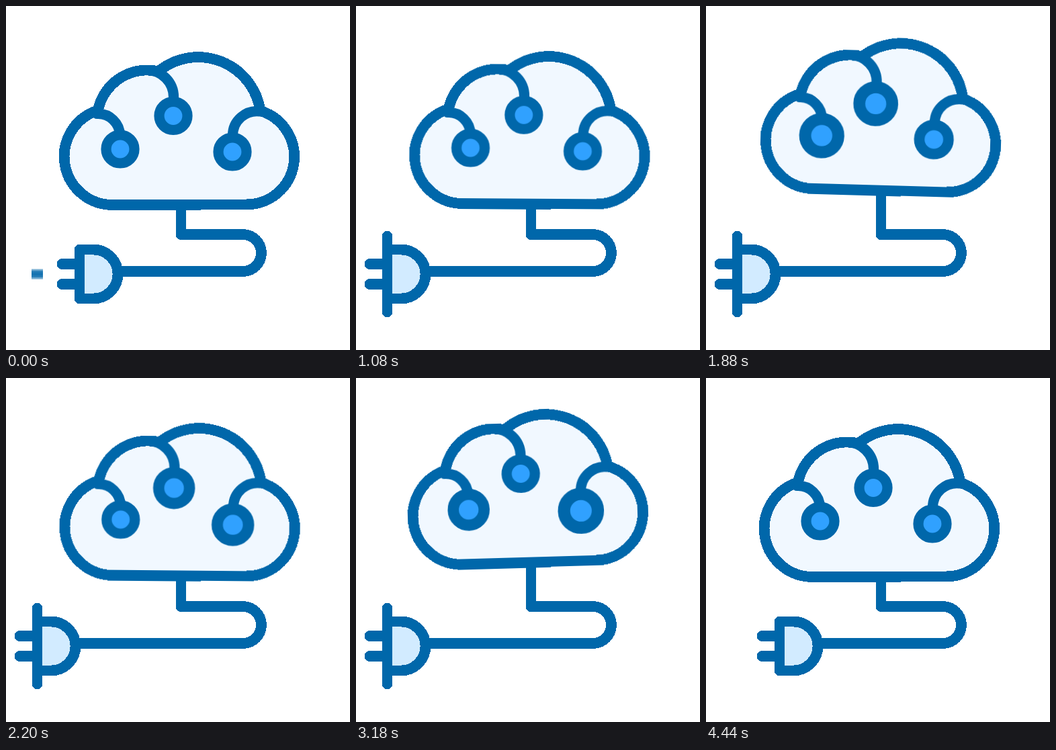
Animation, 512 px wide and 512 px high, one loop 4820 ms. Source, as an HTML page:

```html
<!DOCTYPE html>
<html lang="en">
<head>
<meta charset="utf-8">
<title>Cloud power</title>
<style>
  :root {
    --line: #0067aa;
    --sine: cubic-bezier(.37, 0, .63, 1);
    --cubic-in: cubic-bezier(.333, 0, .667, 0);
    --cubic-out: cubic-bezier(.333, 1, .667, 1);
  }
  html, body { margin: 0; width: 100%; height: 100%; overflow: hidden; background: #fff; }
  svg { display: block; width: 100%; height: 100%; }
  path, circle {
    fill: none;
    stroke: var(--line);
    stroke-width: 15.2;
    stroke-linecap: round;
    stroke-linejoin: round;
  }
  .hard { stroke-width: 15.8; shape-rendering: crispEdges; }
  .body { fill: #f1f8ff; }
  .shell { fill: #d2ebff; }
  .node { fill: #30a1ff; }

  .wall, .plug, .stem, .bob, .sway, .node {
    animation: 4820ms var(--sine) infinite both;
  }
  .wall, .stem { vector-effect: non-scaling-stroke; }
  .wall { transform-origin: 46.5px 399px; animation-name: grow; }
  .plug { animation-name: slide; }
  .stem { transform-origin: 260.5px 340px; animation-name: stretch; }
  .bob { animation-name: bob; }
  .sway { transform-origin: 258px 296px; animation-name: sway; }
  .node {
    transform-box: fill-box;
    transform-origin: 50% 0;
    animation-name: pulse;
    animation-delay: calc(var(--i) * 200ms);
  }

  @keyframes grow {
    0% { transform: scaleY(0); visibility: hidden; animation-timing-function: var(--cubic-out); }
    16.598% { transform: scaleY(1); visibility: visible; }
    75.519% { transform: scaleY(1); visibility: visible; animation-timing-function: var(--cubic-in); }
    92.116%, 100% { transform: scaleY(0); visibility: hidden; }
  }
  @keyframes slide {
    0%, 4.979% { transform: translateX(0); }
    17.427%, 74.689% { transform: translateX(-63px); }
    87.137%, 100% { transform: translateX(0); }
  }
  @keyframes bob {
    0%, 20.643%, 47.614%, 74.585%, 100% { transform: translateY(0); }
    34.129%, 61.1% { transform: translateY(-30px); }
  }
  /* 44px stem plus the 30px lift */
  @keyframes stretch {
    0%, 20.643%, 47.614%, 74.585%, 100% { transform: scaleY(1); }
    34.129%, 61.1% { transform: scaleY(1.6818); }
  }
  @keyframes sway {
    0%, 17.635% { transform: rotate(0); }
    34.232% { transform: rotate(1.9deg); }
    61.8% { transform: rotate(-1.9deg); }
    78.838%, 100% { transform: rotate(0); }
  }
  @keyframes pulse {
    0%, 24.689%, 41.286%, 57.884%, 74.481%, 100% { transform: scale(1); }
    32.988%, 49.585%, 66.183% { transform: scale(1.2); }
  }
</style>
</head>
<body>
<svg viewBox="0 0 512 512">
  <path class="hard wall" d="M46.5 342.5V455.5"/>

  <path class="hard stem" d="M260.5 340V296"/>
  <path class="hard" d="M260.5 340H352.5A27.5 27.5 0 0 1 352.5 395H260"/>

  <g class="plug">
    <path class="hard" d="M167 395H330M83.5 384H109.5M83.5 414H109.5"/>
    <path class="hard shell" d="M109.5 362.5H130A36.5 36.5 0 0 1 130 435.5H109.5Z"/>
  </g>

  <g class="bob">
    <g class="sway">
      <path class="hard body" d="M158.5 296A72 72 0 0 1 135 156L136.6 157.2
        A74.5 74.5 0 0 1 230 98.2L229.5 95.1A93.5 93.5 0 0 1 378.5 156
        L380 156.5A71.2 71.2 0 0 1 358 295.4Z"/>
      <path d="M135.5 160.5A32.5 32.5 0 0 1 169.6 193V205"/>
      <path d="M210 95.5A40 40 0 0 1 249.5 135.5V155"/>
      <path d="M337.5 205V193A36 36 0 0 1 379 157"/>
      <circle class="node" style="--i:0" cx="337" cy="217" r="21"/>
      <circle class="node" style="--i:1" cx="170" cy="213" r="21"/>
      <circle class="node" style="--i:2" cx="249" cy="163.5" r="21"/>
    </g>
  </g>
</svg>
</body>
</html>
```
